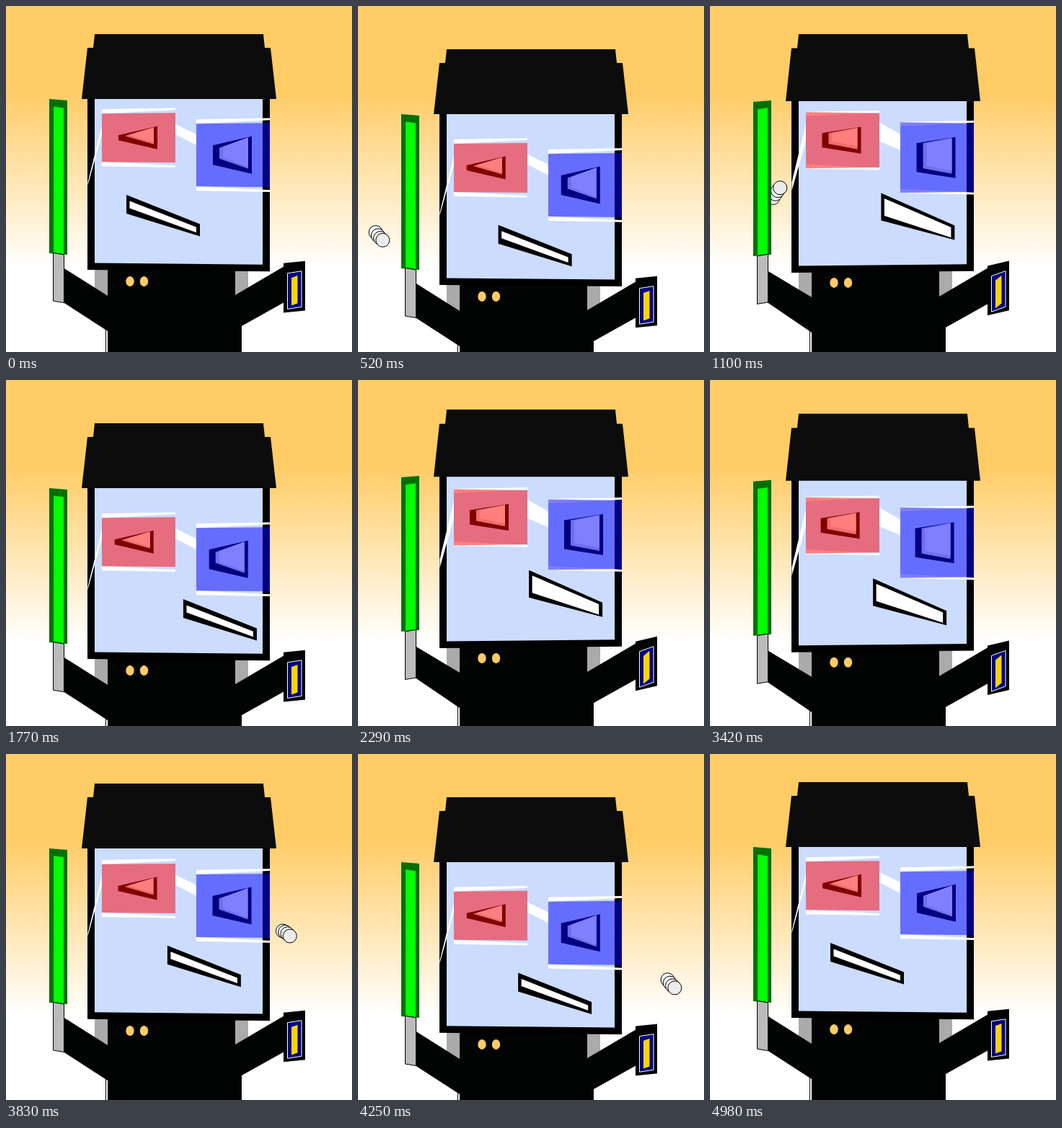
Write an HTML page with a canvas that moves like this. It is 480 px wide and 480 px high and loops after 5 s.

```html
<!DOCTYPE html>
<html lang="en">
<head>
<meta charset="utf-8">
<title>Bobbing block figure</title>
<style>
html, body { margin: 0; width: 100%; height: 100%; overflow: hidden; }
canvas { display: block; }
</style>
</head>
<body>
<canvas id="stage" width="480" height="480"></canvas>
<script>
const ctx = document.getElementById('stage').getContext('2d');
const LOOP = 4.98, PERIOD = LOOP / 4, LEAD = 0.025;
const BLACK = '#020404', HAT = '#0c0c0c', FACE = '#ccdcff', GOLD = '#ffcc66';

const sky = ctx.createLinearGradient(0, 120, 0, 362);
sky.addColorStop(0, GOLD);
sky.addColorStop(1, '#fff');

// The figure sinks with narrow features (open 0) and rises with wide ones (open 1).
let open = 0, lean = 1;

const bob = t => 10.9 * (1 - Math.cos(2 * Math.PI * t / PERIOD));

function smooth(u) {
  u = Math.min(1, Math.max(0, u));
  return u * u * (3 - 2 * u);
}

// The mouth slides out, overshoots, settles and returns.
function mouthX(t) {
  const settle = 50 + 100 * Math.exp(-0.7 * t);
  return 167 + settle * smooth(t / 1.67) * smooth((LOOP - t) / 0.7);
}

function paint(fill, stroke) {
  ctx.fillStyle = fill;
  ctx.fill();
  if (!stroke) return;
  ctx.strokeStyle = stroke;
  ctx.lineWidth = 1;
  ctx.stroke();
}

function poly(fill, corners, stroke) {
  ctx.beginPath();
  for (const [x, y] of corners) ctx.lineTo(x, y);
  ctx.closePath();
  paint(fill, stroke);
}

// Upright sides centred on y, dropping by tilt, with half heights at left and right.
function slab(fill, x0, x1, y, tilt, left, right = left, stroke) {
  const a = y - tilt / 2, b = y + tilt / 2;
  poly(fill, [[x0, a - left], [x1, b - right], [x1, b + right], [x0, a + left]], stroke);
}

function disc(x, y, rx, ry, fill, stroke) {
  ctx.beginPath();
  ctx.ellipse(x, y, rx, ry, 0, 0, 2 * Math.PI);
  paint(fill, stroke);
}

function rect(fill, x, y, w, h) {
  ctx.fillStyle = fill;
  ctx.fillRect(x, y, w, h);
}

function shifted(x, y, draw) {
  ctx.save();
  ctx.translate(x, y);
  draw();
  ctx.restore();
}

function ball(t) {
  for (let i = 3; i >= 0; i--) {
    const s = t - i * 0.03;
    disc(108.6 * s - 25, 245 + 3.8 * bob(s), 9.5, 9.5, i ? '#f6f6f6' : '#ececec', '#000');
  }
}

function body() {
  rect(BLACK, 141, 358, 177, 130);
  rect(BLACK, 318, 425, 9, 60);
  rect(BLACK, 138, 448, 1, 40);
  for (const x of [123, 318]) rect('#aaa', x, 360, 18, 45);
  slab(BLACK, 80, 141, 407, 39, 24 - 2 * open, 24.5);
  slab(BLACK, 318, 386, 405.5, -39, 24, 25);
  for (const x of [172, 191.5]) disc(x, 382, 5.7, 7, GOLD);
}

function saber() {
  slab('#007000', 60, 85, 237, 2 * lean, 107);
  slab('#0f0', 66, 80, 241.7, 2 * lean, 101.3);
  slab('#bbb', 65.5, 80.5, 377, 2.5 * lean, 33.3, 33.3, '#000');
}

function badge() {
  const tilt = 2 * lean - 5;
  slab(BLACK, 385, 415, 389.5, tilt, 34.3);
  slab('#000080', 390.5, 410, 394, tilt, 24.8, 24.8, '#fff');
  slab('#ffd400', 396, 404.5, 394.7, tilt, 19.3);
}

function head() {
  slab('#000', 113, 366, 243.5, 2.2 * lean, 123.5);
  slab(FACE, 123, 356, 239, 2.2 * lean, 118.5);
}

function hat() {
  const stretch = y => y + open * (y - 95) * 0.035;
  const half = [[117, 39], [119, 58], [127, 58], [135, 129]];
  const side = sign => half.map(([x, y]) => [240 + sign * x, stretch(y)]);
  poly(HAT, [...side(1), ...side(-1).reverse()]);
}

function eye(x, y, h) {
  slab('#000', x + 23, x + 77, y, 0, h - 30 + 6.5 * open, h - 17.5 + 2.5 * open);
  slab('#ddd', x + 32, x + 72, y - 2.5, 0, Math.max(0, h - 36 + 10 * open), h - 22 + 3.5 * open);
  slab('#fff', x + 37, x + 72, y - 4, 0, Math.max(0, h - 36 + 8 * open), h - 23 + 2 * open);
}

function lens(color, x, y, h, sway) {
  eye(x + sway, y, h);
  const end = x + 102;
  for (const s of [-1, 1]) {
    const edge = d => y + s * (h + d);
    poly('#fff', [[x, edge(6)], [end, edge(7.8)], [end, edge(5)], [x, edge(0)]]);
  }
  slab(color, x, end, y, 0, h + 5.5 * open, h + 1 + 3 * open);
}

function glasses(sway) {
  slab('#fff', 113.5, 133, 209, -75, 2 + 4 * open, 6 + 5.5 * open);
  slab('#fff', 235, 264, 178, 14.5, 7 + 6 * open, 7.5 + 3.5 * open);
  lens('rgba(255,0,0,.5)', 133, 182.5, 33.5, sway);
  lens('rgba(0,0,255,.5)', 264, 206.5, 43.5, sway);
}

function mouth() {
  slab('#000', 0, 102, 292.8, 36, 13 + 6 * open, 8.5 + 1.5 * open);
  slab('#fff', 4.5, 97, 292.8, 35, 5 + 7 * open, 3.7 + 3.5 * open);
}

function draw(seconds) {
  const t = seconds % 5 % LOOP, phase = t + LEAD, y = bob(phase);
  open = phase % PERIOD > PERIOD / 2 ? 1 : 0;
  lean = 1 - 2 * open;

  rect(sky, 0, 0, 480, 480);
  ball(phase);
  shifted(0, y, () => {
    body();
    saber();
    badge();
    head();
  });
  shifted(0, 2 * y, () => {
    glasses(-y / 4);
    shifted(mouthX(t), 0, mouth);
  });
  shifted(0, y, hat);
}

const start = performance.now();
(function frame() {
  draw((performance.now() - start) / 1000);
  requestAnimationFrame(frame);
})();
</script>
</body>
</html>
```
